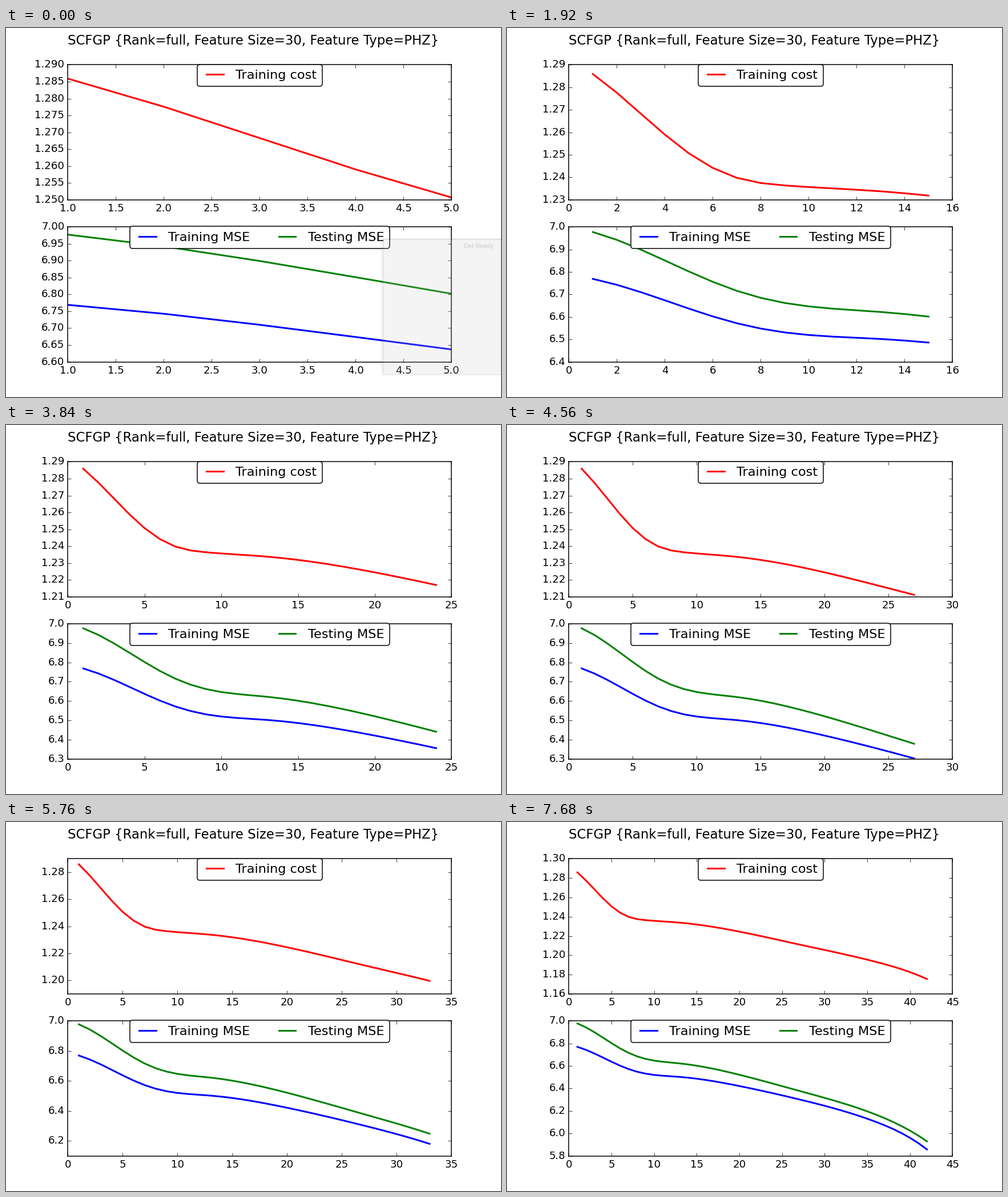
Recreate the animation shown at these times as a matplotlib script. Size 867 px wide and 646 px high, loop 8000 ms.

```python
import math

import matplotlib.pyplot as plt
import numpy as np
from matplotlib.animation import FuncAnimation
from matplotlib.patches import Rectangle
from matplotlib.transforms import IdentityTransform

W, H = 867, 646
DPI = W / 8
STEP_MS, LOOP_MS = 40, 8000

plt.style.use("classic")
plt.rcParams.update({
    "figure.facecolor": "white",
    "savefig.facecolor": "white",
    "savefig.dpi": "figure",
    "font.family": "DejaVu Sans",
})

# Key epochs and the values the three curves pass through there
KEYS = np.array([1, 3, 5, 7, 9, 13, 20, 27, 36, 39, 42])
COST = [1.2859, 1.2683, 1.2507, 1.2398, 1.2364, 1.2338, 1.2245, 1.2112, 1.1932, 1.1856, 1.1754]
TRAIN = [6.769, 6.710, 6.637, 6.572, 6.531, 6.502, 6.421, 6.3025, 6.103, 6.0035, 5.858]
TEST = [6.977, 6.899, 6.802, 6.716, 6.662, 6.622, 6.521, 6.3785, 6.1675, 6.066, 5.9295]

EPOCHS = np.arange(1, 43)


def spline_basis(x):
    """Cubic spline basis with as many functions as key epochs."""
    t = x[:, None] / KEYS[-1]
    joints = KEYS[2:-2] / KEYS[-1]
    return np.hstack([t ** np.arange(4), np.maximum(t - joints, 0) ** 3])


def smooth(values):
    return spline_basis(EPOCHS) @ np.linalg.solve(spline_basis(KEYS), values)


def epochs_shown(frame):
    """The screen refreshes every 3 frames; training adds points a bit slower than every 5 refreshes."""
    redraws = math.ceil((frame // 3 - 0.12) / 5.27)
    return max(5 + 2 * redraws, 3 + 3 * redraws)


def bins(lo, hi, n=9):
    """Round-number bin edges covering lo..hi."""
    scale = 10.0 ** math.floor(math.log10((hi - lo) / n))
    raw = (hi - lo) / n / scale
    for s in (1, 2, 5, 10):
        if s < raw:
            continue
        step = s * scale
        start = step * (lo // step)
        if start + step * n >= hi:
            break
    n -= int((start + step * n - hi) // step)
    return start + step * np.arange(n + 1)


def fit_axis(lo, hi, set_ticks, set_lim, slack=0.0):
    edges = bins(float(lo), float(hi))
    lo, hi = float(edges[0]), float(edges[-1])
    ticks = bins(lo + slack, hi + 3 * slack)
    set_ticks([t for t in ticks if lo - 1e-7 <= t <= hi + 1e-7])
    set_lim(lo, hi)


fig, axes = plt.subplots(2, 1, figsize=(W / DPI, (H + 1e-6) / DPI), dpi=DPI)
fig.subplots_adjust(left=0.125, right=0.9, bottom=61.4 / H, top=581.6 / H, hspace=0.2)
fig.suptitle("SCFGP {Rank=full, Feature Size=30, Feature Type=PHZ}",
             fontsize=15.1, y=635.4 / H)

curves = []
for ax, series in zip(axes, (
        [("Training cost", "r", COST)],
        [("Training MSE", "b", TRAIN), ("Testing MSE", "g", TEST)])):
    group = []
    for label, color, values in series:
        line, = ax.plot([], [], color=color, lw=2, label=label)
        group.append((line, smooth(values)))
    curves.append(group)
    ax.ticklabel_format(useOffset=False)
    ax.legend(loc="upper center", bbox_to_anchor=(0.5, 1.05), ncol=2, fancybox=True,
              fontsize=14.85, borderpad=0.41, handlelength=1.93, handletextpad=0.67,
              columnspacing=1.95)


def pixel_rect(x0, y0, x1, y1, **style):
    return fig.add_artist(Rectangle((x0, H - y1), x1 - x0, y1 - y0,
                                    transform=IdentityTransform(), zorder=5, **style))


# Fading pop-up panel with a soft shadow
popup = [pixel_rect(660, 370, 900, 604, fc=(0.78,) * 3, ec="none", alpha=0.18)]
for d in range(6):
    popup.append(pixel_rect(659.5 - d, 369.5 - d / 2, 900, 604.5 + d, fill=False,
                            ec="black", lw=72 / DPI, alpha=0.1 * (1 - d / 6) ** 2))
popup.append(fig.text(828 / W, 1 - 382 / H, "Get Ready", ha="center", va="center",
                      family="Liberation Sans", weight="bold", size=10.5 * 72 / DPI,
                      color="0.84", zorder=6))


def update(frame):
    n = epochs_shown(frame)
    for ax, group in zip(axes, curves):
        for line, values in group:
            line.set_data(EPOCHS[:n], values[:n])
        shown = np.array([values[:n] for _, values in group])
        fit_axis(1, n, ax.set_xticks, ax.set_xlim)
        fit_axis(shown.min(), shown.max(), ax.set_yticks, ax.set_ylim, slack=1e-9)
    for artist in popup:
        artist.set_visible(frame < 3)
    return []


anim = FuncAnimation(fig, update, frames=LOOP_MS // STEP_MS, interval=STEP_MS,
                     repeat=True, repeat_delay=0, blit=False)
plt.show()
```
